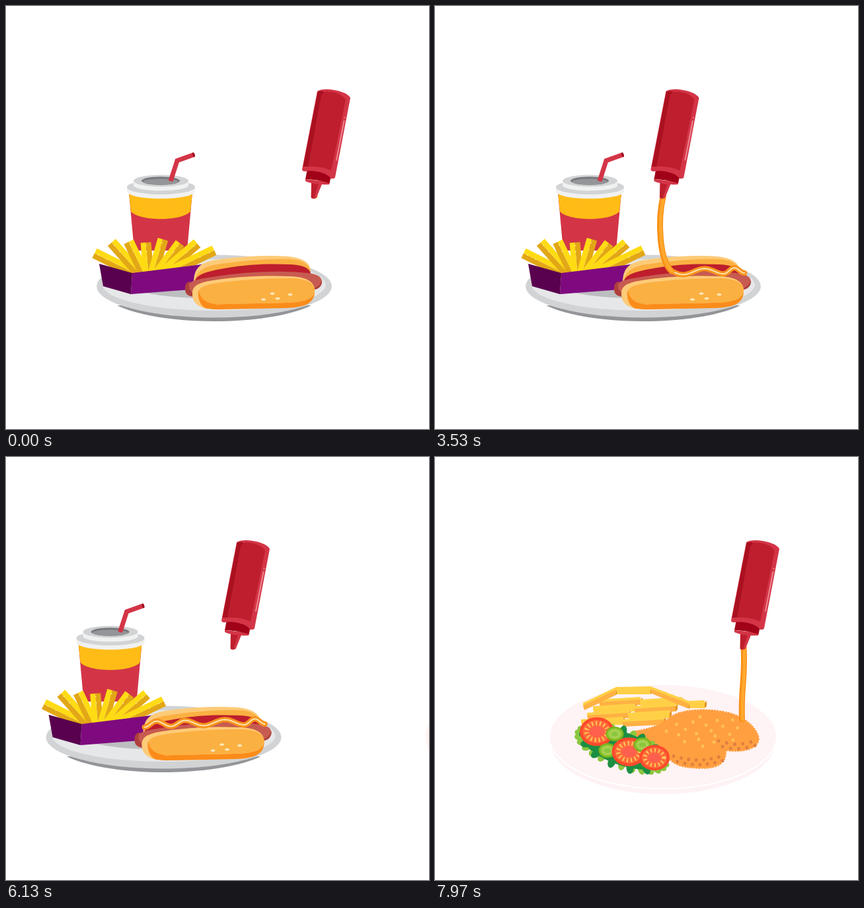
An HTML page that plays this animation: 640x640 px, repeating every 8000 ms.

```html
<!DOCTYPE html>
<html lang="en">
<head>
<meta charset="utf-8">
<title>Fast food and sauce</title>
<style>
  html, body { margin: 0; width: 100%; height: 100%; overflow: hidden; background: #fff; }
  svg { display: block; width: 100%; height: 100%; }
  .sauce { fill: none; stroke-linecap: round; stroke-linejoin: round; }
</style>
</head>
<body>
<svg viewBox="0 0 640 640">
  <g id="hotdogMeal">
    <path d="M168 453C235 485 395 485 462 453Z" fill="#939598"/>
    <ellipse cx="315" cy="424" rx="178" ry="47.5" fill="#d1d3d4"/>
    <ellipse cx="315" cy="422" rx="169" ry="39" fill="#e6e7e8"/>
    <path d="M212 434L290 428V442Q245 441 212 434Z" fill="#bcbec0"/>

    <!-- cup -->
    <path d="M186 282H282L274 370H194Z" fill="#d33547"/>
    <path d="M186 282H282L279 311C265 326 203 326 189 311Z" fill="#ffbc16"/>
    <path d="M183 274H286V281C280 295 189 295 183 281Z" fill="#f0f1f1"/>
    <ellipse cx="234.5" cy="274" rx="51.5" ry="11" fill="#d1d3d4"/>
    <path d="M193 265H276V272C270 282 199 282 193 272Z" fill="#f0f1f1"/>
    <ellipse cx="234.5" cy="264.5" rx="41.5" ry="9" fill="#d1d3d4"/>
    <ellipse cx="234" cy="264.5" rx="29" ry="6.2" fill="#77797c"/>
    <ellipse cx="234" cy="266" rx="27" ry="4.6" fill="#939598"/>
    <path d="M249 265L259 234L284 225" fill="none" stroke="#d33547" stroke-width="7"/>
    <ellipse cx="284" cy="225" rx="1.7" ry="3.6" fill="#a00b1c" transform="rotate(-18 284 225)"/>

    <g id="boxFries"></g>
    <path d="M191 404L304 390L292 428L189 436Z" fill="#7f0a7f"/>
    <path d="M141 390L191 404L189 436L147 424Z" fill="#59004f"/>

    <!-- hot dog -->
    <path d="M284 416C285 396 294 388 318 384C360 378 400 377 428 379C448 381 461 388 461 402Z" fill="#fdcb78"/>
    <path d="M286 416C288 402 298 394 320 391C360 385 400 382 430 383C449 384 459 391 461 402Z" fill="#fbb042"/>
    <path d="M285 418C288 406 302 402 330 397C370 390 400 390 430 391C450 392 460 396 462 408L440 420Z" fill="#be1e2d"/>
    <path d="M272 434C268 420 282 415 300 412C350 403 410 399 455 404C471 405 478 410 478 417C477 427 468 431 455 430L300 440Q276 442 272 434Z" fill="#c75b51"/>
    <path d="M271 427C271 418 276 417 279 417C274 424 278 434 290 438C277 442 271 436 271 427ZM478 415C479 425 470 431 460 429C470 427 475 423 478 415Z" fill="#ad3f3c"/>
    <path d="M282 435C282 420 298 417 328 413C370 408 400 408 430 409C456 410 468 418 467 433C466 451 450 456 424 457L325 459C300 460 282 453 282 435Z" fill="#fb8c1a"/>
    <path d="M282 435C282 420 298 417 328 413C370 408 400 408 430 409C456 410 468 418 467 432C464 445 448 448 424 449L330 451C312 452 300 452 294 450Q284 445 282 435Z" fill="#fdcb78"/>
    <path d="M291 434C292 422 312 420 336 417C372 413 400 412 430 412C454 412 468 419 467 431C464 445 448 448 424 449L330 451C312 452 304 453 297 448Q291 443 291 434Z" fill="#fbb042"/>
    <path d="M291 433C290 443 293 453 304 458Q282 454 282 435Q282 426 291 421Z" fill="#fdcb78"/>
    <path d="M291 430C290 443 293 453 304 458L318 451Q296 450 291 430Z" fill="#fb8c1a"/>
    <g fill="#fde9bb">
      <ellipse cx="403" cy="435" rx="3.4" ry="1.8"/><ellipse cx="430" cy="436.5" rx="3.4" ry="1.8"/>
      <ellipse cx="389.5" cy="444" rx="3.4" ry="1.8"/><ellipse cx="411" cy="442.5" rx="3.4" ry="1.8"/>
    </g>
    <path id="wave" class="sauce" stroke="#f7941d" stroke-width="8"/>
    <path id="waveShine" class="sauce" stroke="#fee3b0" stroke-width="2"/>
  </g>

  <g id="chickenMeal">
    <ellipse cx="345" cy="431" rx="170" ry="79" fill="#fef2f4"/>
    <ellipse cx="345" cy="425" rx="172" ry="78" fill="#fff"/>
    <ellipse cx="345" cy="423" rx="171" ry="78" fill="#fef3f5"/>
    <g id="plateFries"></g>
    <path fill="#ff9f40" stroke="#ff9f40" stroke-width="4" stroke-linecap="round" stroke-dasharray="0 4.2"
      d="M300 416C330 412 345 404 358 393C380 380 420 382 445 388C468 394 486 410 489 425C490 440 468 447 439 443C441 462 428 470 405 470C375 470 360 465 352 452C330 440 310 430 300 416Z"/>
    <g id="crumbs"></g>
    <g id="salad"></g>
  </g>

  <path id="stream" class="sauce" pathLength="1" stroke="#f98f16" stroke-width="9"/>
  <path id="streamShine" class="sauce" pathLength="1" stroke="#ffa92e" stroke-width="5" transform="translate(.8)"/>

  <g id="bottle">
    <path d="M462 263L479 266L469.5 290Q465 293 461.5 290Z" fill="#be1e2d"/>
    <path d="M474 266L479 267L469.5 290L466 291Z" fill="#d33547"/>
    <path d="M453 262L490 266L489 270Q465 271 453 265Z" fill="#d33547"/>
    <path d="M456 246L493 252L489.5 268Q470 262 453 262Z" fill="#a10217"/>
    <path d="M471 129C480 122 516 128 521 139L498 259Q497 262 491 261C488 253 466 248 455 250Q448 251 448 247Z" fill="#d33547"/>
    <path d="M471.5 130Q474 128 481 129L457 243Q452 243 449.5 243Z" fill="#aa1120"/>
    <path d="M481 130C495 128 510 134 514 142L492 249C482 244 468 242 457 243L476 140Q478 132 481 130Z" fill="#be1e2d"/>
    <path d="M511.5 174L500 233" stroke="#ee8791" stroke-width="2" stroke-linecap="round"/>
    <circle cx="512.5" cy="169" r="1.1" fill="#ee8791"/>
  </g>
</svg>
<script>
const $ = id => document.getElementById(id);
const clamp = v => Math.min(1, Math.max(0, v));
const progress = (t, start, end) => clamp((t - start) / (end - start));
const mix = (a, b, k) => a + (b - a) * k;
const repeat = (n, make) => Array.from({ length: n }, (_, i) => make(i, i / (n - 1))).join('');

// Symmetric cubic-bezier(a, 0, 1 - a, 1), solved by bisection.
function ease(u, a) {
  let lo = 0, hi = 1;
  for (let i = 0; i < 24; i++) {
    const s = (lo + hi) / 2, r = 1 - s;
    const x = 3 * s * r * r * a + 3 * s * s * r * (1 - a) + s ** 3;
    if (x < u) lo = s; else hi = s;
  }
  return lo * lo * (3 - 2 * lo);
}

const polygon = (fill, ...points) => `<polygon points="${points}" fill="${fill}"/>`;
const oval = (x, y, rx, ry, fill, more = '') =>
  `<ellipse cx="${x}" cy="${y}" rx="${rx}" ry="${ry}" fill="${fill}" ${more}/>`;

// Fries fan out of the box; the dark side of each one faces down.
function boxFry(i, k) {
  const x = mix(134, 315, k), y = 356 + 15 * (2 * k - 1) ** 4 + 3 * Math.cos(i * 2.4);
  const dx = mix(194, 244, k) - x, dy = 404 - y, length = Math.hypot(dx, dy);
  const lean = dx > 15 ? -1 : 1;
  const nx = lean * dy / length * 8, ny = -lean * dx / length * 8;
  const strip = (from, to, fill) => polygon(fill,
    [x + nx * from, y + ny * from], [x + nx * to, y + ny * to],
    [x + nx * to + dx, y + ny * to + dy], [x + nx * from + dx, y + ny * from + dy]);
  return strip(0, 1, '#e2a716') + strip(-1, 0, '#ffdb14') +
    oval(x + dx * .1, y + dy * .1, 1, .8, '#fff0a0') + oval(x + dx * .3, y + dy * .3, 1, .8, '#fff0a0');
}
$('boxFries').innerHTML = repeat(8, boxFry);

// A lying fry: thin bright top, taller front and a dark cut end.
const plank = (x1, y1, x2, y2, front) =>
  polygon('#ffd147', [x1, y1], [x2, y2], [x2, y2 + 5], [x1, y1 + 5]) +
  polygon(front, [x1, y1 + 4], [x2, y2 + 4], [x2, y2 + 12], [x1 + 2, y1 + 11]) +
  polygon('#e8921c', [x2, y2 + 4], [x2 + 3, y2 + 1], [x2 + 3, y2 + 9], [x2, y2 + 12]);
const plankColor = i => i % 2 ? '#ffcf45' : '#ffb143';
const ridge = [[224, 372], [274, 348], [326, 347], [384, 369], [408, 368]];
$('plateFries').innerHTML =
  repeat(8, i => {
    const row = i >> 1, x = 248 - 9 * row + 62 * (i % 2), y = 367 + 10 * row;
    return plank(x, y, x + 63, y - 4, plankColor(i + row));
  }) +
  repeat(4, i => plank(...ridge[i], ...ridge[i + 1], plankColor(i)));

// Pale crumbs spread as a sunflower, brown ones zigzag along both lower edges.
const crumb = (x, y, fill) => oval(x, y, 2.4, 2.6, fill);
const brownEdge = (n, x1, x2, y, sag) => repeat(n, (i, k) =>
  crumb(mix(x1, x2, k), y + sag * Math.sin(Math.PI * k) + (i % 2 ? 3.5 : -3.5), '#e0803f'));
$('crumbs').innerHTML =
  repeat(20, i => {
    const r = Math.sqrt((i + .5) / 20), a = i * 2.4;
    return crumb(408 + 62 * r * Math.cos(a), 414 + 24 * r * Math.sin(a), '#ffc05a');
  }) + brownEdge(14, 361, 435, 456, 6) + brownEdge(10, 429, 484, 433, 5);

const tomato = (x, y, r) =>
  oval(x, y, r, r * .84, '#ff4b2b') +
  oval(x, y, r * .83, r * .67, '#ff6a3c') +
  oval(x, y, r * .62, r * .49, 'none', `stroke="#ffca58" stroke-width="${r * .26}" stroke-dasharray="2 4"`) +
  oval(x, y, r * .42, r * .31, '#ff5f4d');
const cucumber = (x, y) =>
  oval(x, y, 13.5, 11, '#7ab51d') + oval(x, y, 11, 8.5, '#96c93d') +
  oval(x, y, 7, 5.2, 'none', 'stroke="#c6e27e" stroke-width="2.6" stroke-dasharray="1 1.6"') +
  oval(x, y, 4.5, 3, '#8cc63f');

// Lettuce: two rings of leaves pointing outwards around a dark bed.
const leafRing = (n, rx, ry, fill, turn) => repeat(n, i => {
  const a = (i + turn) / n * 2 * Math.PI;
  return oval(rx * Math.cos(a), ry * Math.sin(a), 9, 5.5, fill,
    `transform="rotate(${a * 180 / Math.PI} ${rx * Math.cos(a)} ${ry * Math.sin(a)})"`);
});
$('salad').innerHTML =
  `<g transform="translate(283 441) rotate(20)">${
    leafRing(26, 67, 23, '#8cc63f', 0) + oval(0, 0, 64, 25, '#1c8f43') + leafRing(13, 60, 25, '#1c8f43', .5)}</g>` +
  tomato(245, 415.5, 26) + cucumber(272, 419) + cucumber(261, 444) +
  tomato(293.5, 446, 26) + cucumber(314, 435.5) + tomato(332, 455, 23);

// Sauce zigzag on the hot dog: alternating troughs and crests, right to left.
const turns = [468, 453, 437, 408, 375, 347, 326, 304, 286];
const turnY = i => 400 + i * .6 + (i % 2 ? -4.5 : 4);
function waveY(x) {
  const i = Math.max(1, turns.findIndex(turn => turn <= x));
  const k = progress(x, turns[i - 1], turns[i]);
  return mix(turnY(i - 1), turnY(i), (1 - Math.cos(Math.PI * k)) / 2);
}
function wavePath(end) {
  let d = `M468 ${waveY(468)}`;
  for (let x = 466; x > end; x -= 2) d += `L${x} ${waveY(x)}`;
  return d + `L${end} ${waveY(end)}`;
}

function show(ids, visible, attrs) {
  for (const id of ids) {
    $(id).style.display = visible ? '' : 'none';
    for (const key in attrs) $(id).setAttribute(key, attrs[key]);
  }
}
const moveX = (id, x) => $(id).setAttribute('transform', `translate(${x})`);

function draw(t) {
  const swap = ease(progress(t, 5755, 6830), .7);
  moveX('hotdogMeal', -503 * swap);
  moveX('chickenMeal', 543 * (1 - swap));

  const bottleX = -147 * (progress(t, 1050, 4050) - ease(progress(t, 5755, 7135), .37));
  moveX('bottle', bottleX);

  const waveEnd = mix(467, 286, progress(t, 1000, 5200));
  show(['wave', 'waveShine'], t > 1000, { d: wavePath(waveEnd) });

  const second = t > 7000;
  const tip = second ? progress(t, 7410, 7970) : progress(t, 0, 1050);
  const tail = second ? 0 : progress(t, 4200, 5270);
  const nozzle = 467 + bottleX;
  const bend = second ? 0 : progress(t, 1000, 2000);
  const landX = second ? 464.5 : waveEnd;
  const landY = second ? 397 : waveY(waveEnd);
  const lowX = Math.min(nozzle, landX) - mix(2, 6, bend);
  show(['stream', 'streamShine'], tip > 0 && tail < 1, {
    d: `M${nozzle} 287C${nozzle + mix(3, -9, bend)} ${mix(332, 325, bend)} ${lowX} ${mix(350, 385, bend)} ${landX} ${landY}`,
    'stroke-dasharray': `${Math.max(0, tip - tail)} 2`,
    'stroke-dashoffset': -tail
  });
}

function tick() {
  draw(performance.now() % 8000);
  requestAnimationFrame(tick);
}
tick();
</script>
</body>
</html>
```
